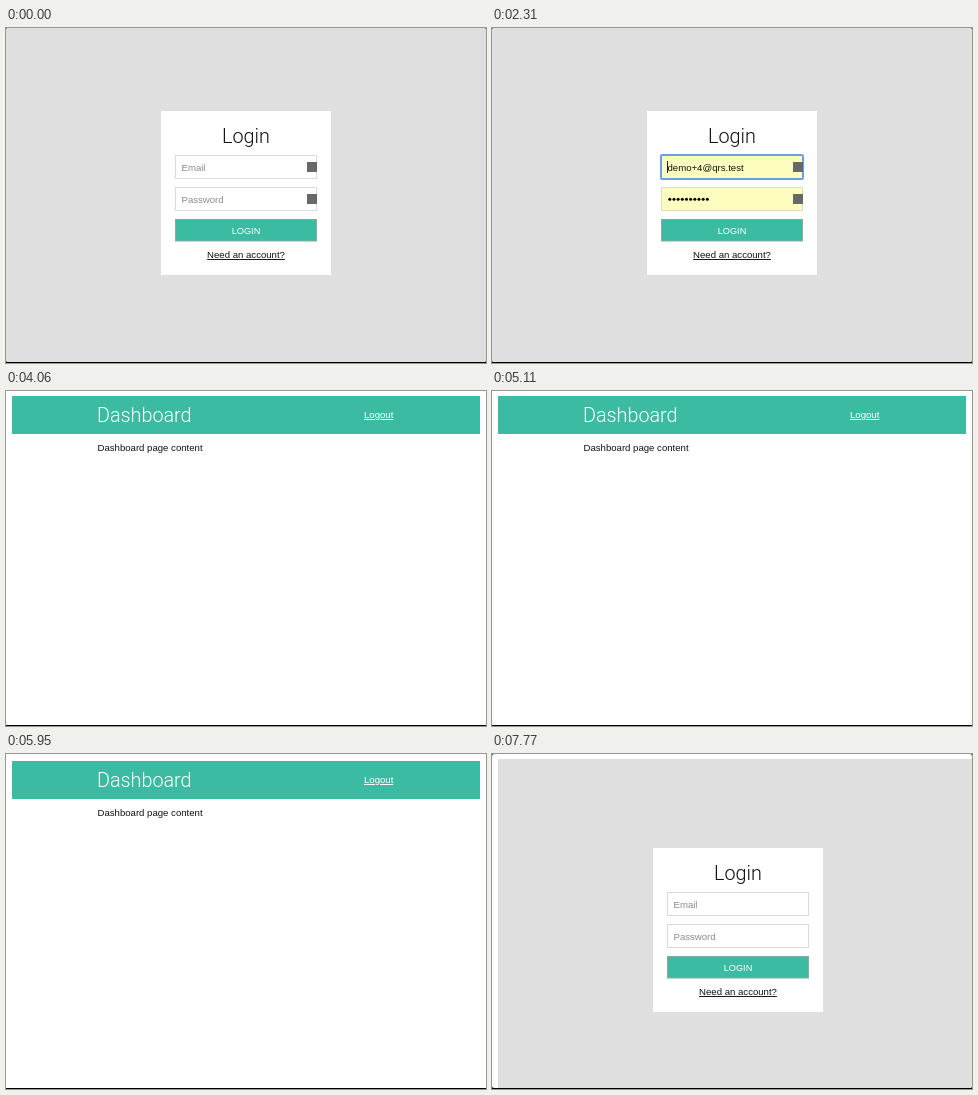
Animation of 480 by 335 pixels, one loop 8000 ms. Source, as an HTML page:

```html
<!DOCTYPE html>
<html lang="en">
<head>
<meta charset="utf-8">
<title>Login flow</title>
<style>
  html, body { margin: 0; width: 100%; height: 100%; overflow: hidden; background: #000; }
  svg { display: block; width: 480px; height: 335px; }
  text { font: 9.6px "Liberation Sans", Arial, sans-serif; fill: #111; }
  .title { font: 300 19.8px Roboto, "Helvetica Neue", sans-serif; }
  .mid { text-anchor: middle; }
  .link { text-decoration: underline; }
  .light { fill: #fff; }
  .hint { fill: #8a8a8a; }
  .field { fill: #fff; stroke: #dadada; }
  .filled { fill: #fdfdbf; stroke: #dcdcc0; }
  .ring { fill: none; stroke: #6d9de3; stroke-width: 2; }
  .caret { fill: #222; }
  .teal { fill: #3bbca2; }
  .icon { fill: #686868; }
</style>
</head>
<body>
<svg viewBox="0 0 480 335">
  <clipPath id="window"><rect width="480" height="334" rx="2"/></clipPath>
  <g clip-path="url(#window)">
    <rect width="480" height="334" fill="#fff"/>

    <g id="login">
      <rect y="-6" width="500" height="360" fill="#dfdfdf"/>
      <rect x="155" y="83" width="170" height="164" fill="#fff"/>
      <text class="title mid" x="240" y="114.5">Login</text>

      <g id="blank">
        <rect class="field" x="169.5" y="127.5" width="141" height="23"/>
        <rect class="field" x="169.5" y="159.5" width="141" height="23"/>
        <text class="hint" x="175.5" y="142.5">Email</text>
        <text class="hint" x="175.5" y="174.5">Password</text>
      </g>
      <g id="filled">
        <rect class="filled" x="169.5" y="127.5" width="141" height="23"/>
        <rect class="filled" x="169.5" y="159.5" width="141" height="23"/>
        <text x="175.5" y="142.5">demo+4@qrs.test</text>
        <g id="dots"></g>
      </g>
      <rect id="emailRing" class="ring" x="169" y="127" width="142" height="24" rx="1.5"/>
      <rect id="caretStart" class="caret" x="175" y="133" width="1" height="12"/>
      <rect id="caretEnd" class="caret" x="252" y="133" width="1" height="11"/>

      <rect class="teal" x="169.5" y="191.5" width="141" height="21.5" stroke="#8aa8a0"/>
      <text class="light mid" x="240" y="205.5" style="font-size:9.2px">LOGIN</text>
      <rect id="buttonRing" class="ring" x="168" y="190" width="144" height="24.5" rx="1.5"/>
      <text class="link mid" x="240" y="230">Need an account?</text>

      <g id="icons">
        <rect id="emailIcon" class="icon" x="301" y="134" width="10" height="10"/>
        <rect class="icon" x="301" y="166" width="10" height="10"/>
      </g>
    </g>

    <g id="dashboard">
      <rect width="480" height="334" fill="#fff"/>
      <g id="page">
        <rect class="teal" x="6" width="468" height="38"/>
        <text class="title light" x="91" y="26">Dashboard</text>
        <text class="light link" x="358" y="22">Logout</text>
        <rect id="linkRing" class="ring" x="356" y="11" width="33" height="15" rx="1.5"/>
        <text x="91.5" y="54.5">Dashboard page content</text>
      </g>
    </g>
  </g>
</svg>
<script>
const LOOP = 8000;
const $ = id => document.getElementById(id);

// Each step is [time in ms, value]; values hold until the next step.
function play(id, prop, steps) {
  const frames = steps.map(([t, v]) => ({ offset: t / LOOP, [prop]: v, easing: 'step-end' }));
  frames.push({ offset: 1, [prop]: steps[steps.length - 1][1] });
  $(id).animate(frames, { duration: LOOP, iterations: Infinity });
}

// Visible from one time to another, hidden otherwise.
function show(id, from, to) {
  play(id, 'opacity', [[0, 0], [from, 1], [to, 0]]);
}

const move = (x, y) => `translate(${x}px, ${y}px)`;

for (let i = 0; i < 10; i++) {
  const dot = document.createElementNS('http://www.w3.org/2000/svg', 'circle');
  dot.setAttribute('cx', 177.8 + i * 4.17);
  dot.setAttribute('cy', 171.3);
  dot.setAttribute('r', 1.5);
  $('dots').append(dot);
}

show('filled', 1750, 7770);
show('emailRing', 1610, 3430);
show('caretStart', 1750, 2660);
show('caretEnd', 2870, 3430);
show('buttonRing', 3430, 4060);
show('dashboard', 4060, 7770);
show('linkRing', 7420, 7770);
play('icons', 'opacity', [[0, 1], [7770, 0]]);
play('emailIcon', 'fill', [[0, '#686868'], [1190, '#000'], [1750, '#686868']]);
play('login', 'transform', [[0, move(0, 0)], [7770, move(6, 11)]]);

// Elastic overscroll of the dashboard.
const scroll = [
  [0, 5], [5180, 4], [5250, 3], [5320, 2], [5390, 1], [5460, 0],
  [5600, 1], [5670, 2], [5740, 4], [5880, 6], [5950, 7], [6230, 6], [6370, 5]
];
play('page', 'transform', scroll.map(([t, y]) => [t, move(0, y)]));
</script>
</body>
</html>
```
